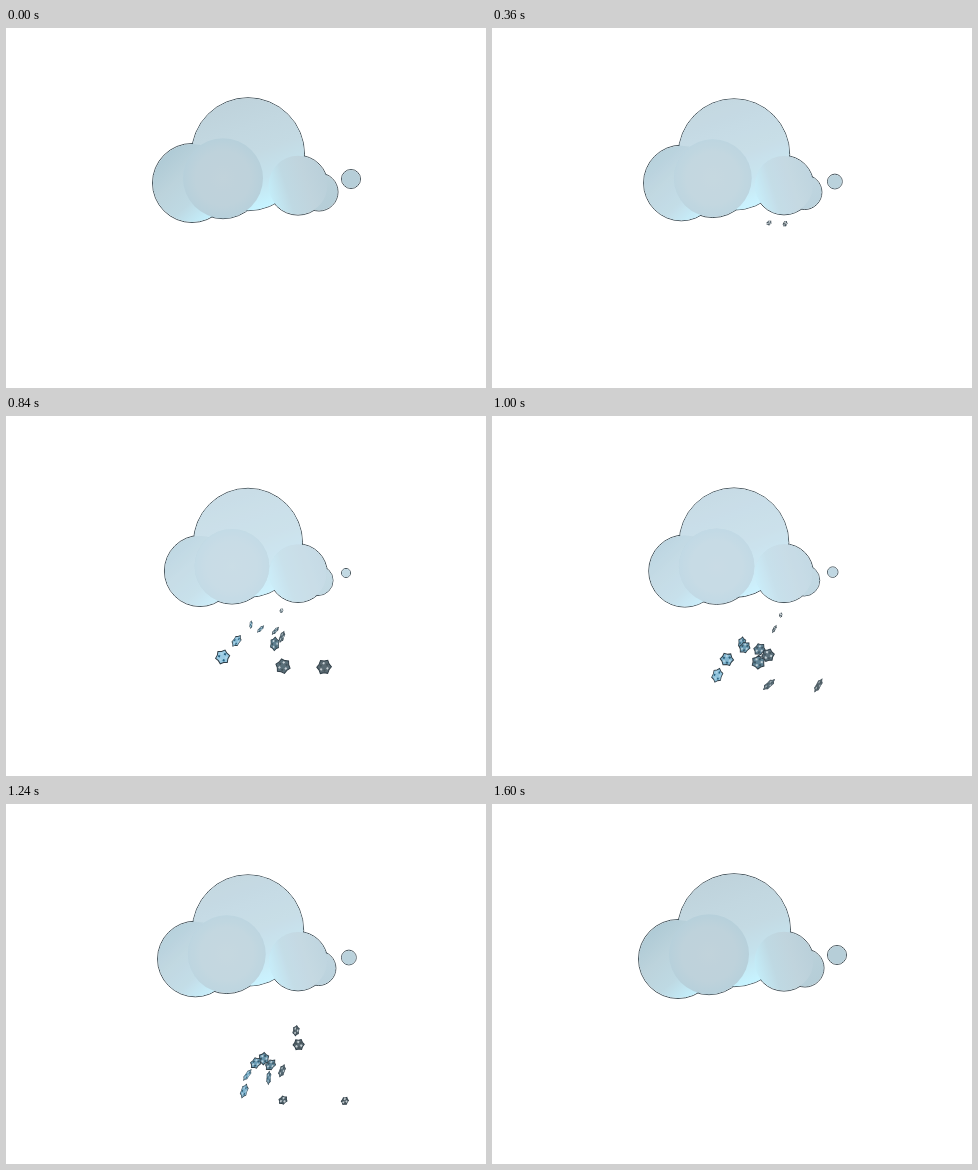
Animation of 480x360 px, one loop 1.64 s. Source, as an HTML page with a canvas:

```html
<!DOCTYPE html>
<html lang="en">
<head>
<meta charset="utf-8">
<title>Snow cloud</title>
<style>
  html, body { margin: 0; width: 100%; height: 100%; overflow: hidden; background: #fff; }
  canvas { display: block; }
</style>
</head>
<body>
<canvas id="stage" width="480" height="360"></canvas>
<script>
const ctx = document.getElementById('stage').getContext('2d');
const LOOP = 1640, STEP = 40, TAU = 2 * Math.PI;
const RELEASE_Y = 180, FALL = .115, LIFE = 1060, LAST = 1570, HALF_SPIN = 560;

// Where and when each flake leaves the cloud; drift in px per second
const flakes = [
  { x: 188, born: 310, drift: 54 },
  { x: 220, born: 449, drift: 27 },
  { x: 237, born: 591, drift: 32 },
  { x: 258, born: 553, drift: -12 },
  { x: 270, born: 713, drift: 43 },
  { x: 273, born: 537, drift: -12 },
  { x: 275, born: 424, drift: -15 },
  { x: 276, born: 485, drift: 0 },
  { x: 277, born: 230, drift: 0 },
  { x: 286, born: 223, drift: 52 },
  { x: 288, born: 834, drift: 5 }
];

const clamp = v => Math.max(0, Math.min(1, v));

function gradient(g, ...colors) {
  colors.forEach((color, i) => g.addColorStop(i / (colors.length - 1), color));
  return g;
}
const linear = (x0, y0, x1, y1, ...colors) =>
  gradient(ctx.createLinearGradient(x0, y0, x1, y1), ...colors);
const radial = ([x, y, r], ...colors) =>
  gradient(ctx.createRadialGradient(x, y, 0, x, y, r), ...colors);

function circle([x, y, r], inset) {
  ctx.beginPath();
  ctx.arc(x, y, r - inset, 0, TAU);
}

function drawFlake(t, { x, born, drift }) {
  const age = t - born, end = Math.min(born + LIFE, LAST);
  if (age <= 0 || t >= end) return;
  const px = x + drift * age / 1000;
  const r = (17 - born * .008) / 2 * clamp(age / 400) * clamp((end - t) / 80);
  const light = clamp((280 - px) / 60);
  const hsl = l => `hsl(200 ${12 + 45 * light}% ${l}%)`;

  ctx.save();
  ctx.translate(px, RELEASE_Y + FALL * age);
  ctx.rotate(-1 + .5 * Math.sin(x));
  ctx.scale(1, Math.max(.35, Math.abs(Math.cos(Math.PI * age / HALF_SPIN))));
  ctx.beginPath();
  for (let i = 0; i < 12; i++) {
    const a = i * TAU / 12, d = i % 2 ? r * .78 : r;
    ctx.lineTo(d * Math.cos(a), d * Math.sin(a));
  }
  ctx.closePath();
  ctx.fillStyle = hsl(40 + 35 * light);
  ctx.fill();
  ctx.strokeStyle = '#2f3d46';
  ctx.stroke();
  for (let i = 0; i < 6; i++) {
    const a = i * TAU / 6 + .4;
    ctx.fillStyle = hsl(i % 2 ? 80 : 32);
    ctx.fillRect(r * .5 * Math.cos(a) - 1, r * .5 * Math.sin(a) - 1, 2, 2);
  }
  ctx.restore();
}

// The pulse p runs from 0 (spread out) to 1 (drawn together)
function drawCloud(p) {
  const top = [242, 126.2 + .6 * p, 57 - 2 * p];
  const left = [186 + 8 * p, 155, 40 - 4 * p];
  const middle = [217 + 9 * p, 150.2, 41 - 2.7 * p];
  const right = [292, 157.2, 30.4 - .6 * p];
  const tail = [313 - p, 164 + .5 * p, 19.5 - 4 * p];
  const dot = [345 - 5 * p, 151 + 6 * p, 10 - 5 * p];
  const parts = [
    [top, linear(228, 75, 264, 176, '#bfd3dc', '#c2d7e0', '#c4dae3', '#c4e2ed', '#c6f3ff')],
    [left, linear(left[0] - 36, 138, left[0] + 14, 194, '#b0cbd6', '#bcd3dc', '#bed9e3', '#c4f0fd')],
    [tail, linear(300, 150, 330, 178, '#bdd2db', '#b4cdd7')],
    [right, linear(262, 168, 320, 150, '#c4effb', '#bfd9e3', '#c0d4dd', '#bad0da')],
    [middle, radial(middle, '#c1d3db', '#bfd2db', '#bed2db', '#b6d0db')],
    [dot, '#b6ced8']
  ];

  ctx.strokeStyle = '#46545c';
  for (const [c] of parts) {
    circle(c, .5);
    ctx.stroke();
  }
  for (const [c, paint] of parts) {
    circle(c, 1);
    ctx.fillStyle = paint;
    ctx.fill();
    ctx.fillStyle = `rgba(217, 238, 250, ${.35 * p})`;
    ctx.fill();
  }
}

const began = performance.now();

function frame() {
  const t = Math.floor((performance.now() - began) % LOOP / STEP) * STEP;
  ctx.clearRect(0, 0, 480, 360);
  flakes.forEach(flake => drawFlake(t, flake));
  drawCloud((1 - Math.cos(TAU * t / (LOOP - STEP))) / 2);
  requestAnimationFrame(frame);
}

frame();
</script>
</body>
</html>
```
